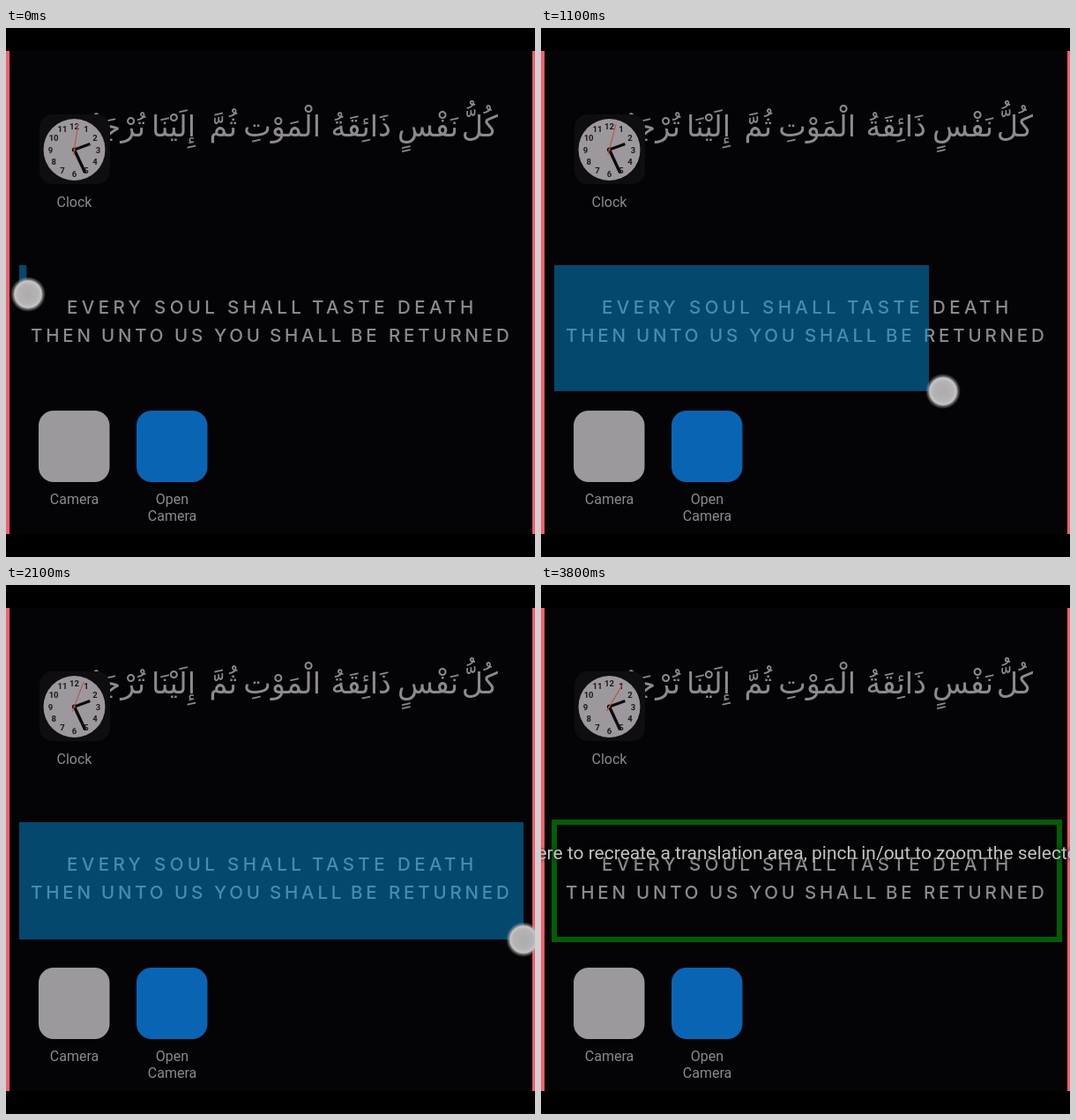
An HTML page with a canvas that plays this animation: 600x600 px, repeating every 3.9 s.

```html
<!DOCTYPE html>
<html lang="en">
<head>
<meta charset="utf-8">
<title>Selecting an area</title>
<style>
html, body { margin: 0; width: 100%; height: 100%; overflow: hidden; background: #000; }
canvas { display: block; }
</style>
</head>
<body>
<canvas id="stage" width="600" height="600"></canvas>
<script>
const ctx = document.getElementById('stage').getContext('2d');
const LOOP = 3900, STEP = 100, RELEASE = 2200, FADE_END = 2500;
const CORNER = { x: 15, y: 269 };
const LAG = 26;
const INK = '#8c8a8c';

// Finger path: time, position, then velocity in px per 100 ms.
const path = [
  { t: 0, x: 25, y: 302, vx: 7, vy: 45 },
  { t: 700, x: 203, y: 407, vx: 52, vy: 2 },
  { t: 1100, x: 456, y: 412, vx: 60, vy: 0.5 },
  { t: 1700, x: 584, y: 404, vx: 2, vy: -1 },
  { t: 2200, x: 587, y: 402, vx: 0, vy: 0 }
];

// Each word with its right edge.
const arabic = [
  ['كُلُّ', 558], ['نَفْسٍ', 513], ['ذَائِقَةُ', 437], ['الْمَوْتِ', 357],
  ['ثُمَّ', 262], ['إِلَيْنَا', 215], ['تُرْجَعُ\u200d', 158]
];

function hermite(a, b, va, vb, u) {
  const u2 = u * u, u3 = u2 * u;
  return (2 * u3 - 3 * u2 + 1) * a + (u3 - 2 * u2 + u) * va +
    (3 * u2 - 2 * u3) * b + (u3 - u2) * vb;
}

function fingerAt(t) {
  const time = Math.min(t, RELEASE);
  let i = 0;
  while (i < path.length - 2 && time > path[i + 1].t) i++;
  const a = path[i], b = path[i + 1];
  const span = b.t - a.t, u = (time - a.t) / span, k = span / 100;
  return {
    x: hermite(a.x, b.x, a.vx * k, b.vx * k, u),
    y: hermite(a.y, b.y, a.vy * k, b.vy * k, u)
  };
}

function text(str, x, y, font, color = INK, align = 'center') {
  ctx.font = font;
  ctx.fillStyle = color;
  ctx.textAlign = align;
  ctx.fillText(str, x, y);
}

function roundBox(x, y, w, h, r, color) {
  ctx.fillStyle = color;
  ctx.beginPath();
  ctx.roundRect(x, y, w, h, r);
  ctx.fill();
}

function disc(x, y, r, color) {
  ctx.fillStyle = color;
  ctx.beginPath();
  ctx.arc(x, y, r, 0, Math.PI * 2);
  ctx.fill();
}

function spacedLine(words, starts, y, spacing) {
  ctx.letterSpacing = spacing + 'px';
  words.split(' ').forEach((word, i) =>
    text(word, starts[i] - 1, y, '500 20.5px Inter, sans-serif', INK, 'left'));
  ctx.letterSpacing = '0px';
}

function drawWallpaper() {
  ctx.fillStyle = '#000';
  ctx.fillRect(0, 0, 600, 600);
  ctx.fillStyle = '#040305';
  ctx.fillRect(0, 26, 600, 548);

  ctx.save();
  ctx.beginPath();
  ctx.rect(97, 60, 503, 110);
  ctx.clip();
  ctx.direction = 'rtl';
  for (const [word, right] of arabic)
    text(word, right, 123, '33.5px "DejaVu Sans", sans-serif', INK, 'right');
  ctx.restore();

  spacedLine('EVERY SOUL SHALL TASTE DEATH', [70, 169, 252, 348, 445], 324, 4.4);
  spacedLine('THEN UNTO US YOU SHALL BE RETURNED',
    [29, 109, 192, 237, 300, 392, 435], 356, 3.8);
}

function hand(angle, tail, length, width, color) {
  ctx.save();
  ctx.rotate(angle * Math.PI / 180);
  ctx.strokeStyle = color;
  ctx.lineWidth = width;
  ctx.beginPath();
  ctx.moveTo(0, tail);
  ctx.lineTo(0, -length);
  ctx.stroke();
  ctx.restore();
}

function drawClock(t) {
  roundBox(38, 98, 80, 79, 15, '#0e0d0f');
  ctx.save();
  ctx.translate(77.5, 138);
  disc(0, 0, 35, '#9c989d');
  for (let n = 1; n <= 12; n++) {
    const a = n * Math.PI / 6;
    text(n, Math.sin(a) * 27, 3.5 - Math.cos(a) * 27,
      'bold 9.5px Roboto, sans-serif', '#1c1a1d');
  }
  hand(70, 0, 19, 3, '#0b0a0b');
  hand(155, 0, 29, 3.4, '#0b0a0b');
  disc(0, 0, 2.6, '#0b0a0b');
  hand(8 + t * 0.006, 6, 30, 1.1, '#b8543f');
  disc(0, 0, 1.2, '#b8543f');
  ctx.restore();
}

function drawApps(t) {
  const label = '16px Roboto, sans-serif';
  drawClock(t);
  text('Clock', 77.5, 203, label);
  roundBox(37, 434, 80.5, 81, 17, '#9b999b');
  text('Camera', 77.5, 540, label);
  roundBox(148, 434, 80.5, 81, 17, '#0a64b4');
  text('Open', 188.5, 540, label);
  text('Camera', 188.5, 559, label);
}

function drawSelection(t) {
  if (t < RELEASE) {
    const end = fingerAt(t - LAG);
    ctx.fillStyle = 'rgba(5, 141, 216, 0.5)';
    ctx.fillRect(CORNER.x, CORNER.y, end.x - CORNER.x, end.y - CORNER.y);
    return;
  }
  ctx.strokeStyle = '#025d06';
  ctx.lineWidth = 6;
  ctx.strokeRect(CORNER.x, CORNER.y, 573, 133);

  const font = '21px Roboto, sans-serif';
  ctx.save();
  ctx.shadowColor = '#000';
  ctx.shadowBlur = 5;
  text('Tap here to recreate a translation area, ', 307, 311, font, '#c4c3c4', 'right');
  text('pinch in/out to zoom the selected area', 307, 311, font, '#c4c3c4', 'left');
  ctx.restore();
}

function drawFinger(t) {
  if (t >= FADE_END) return;
  const { x, y } = fingerAt(t);
  const radius = 20;
  const glow = ctx.createRadialGradient(x, y, 0, x, y, radius);
  glow.addColorStop(0, '#adabac');
  glow.addColorStop(0.55, '#b4b2b3');
  glow.addColorStop(0.76, '#c6c4c5');
  glow.addColorStop(0.84, 'rgba(175, 173, 174, 0.6)');
  glow.addColorStop(1, 'rgba(150, 150, 150, 0)');
  ctx.save();
  if (t >= RELEASE) ctx.globalAlpha = 1 - (t - RELEASE) / (FADE_END - RELEASE);
  disc(x, y, radius, glow);
  ctx.restore();
}

function drawEdges() {
  ctx.fillStyle = '#f65f6f';
  ctx.fillRect(0, 26, 4, 548);
  ctx.fillRect(597, 26, 3, 548);
}

const start = performance.now();

function frame() {
  const elapsed = (performance.now() - start) % LOOP;
  const t = Math.floor(elapsed / STEP) * STEP;
  drawWallpaper();
  drawApps(t);
  drawEdges();
  drawSelection(t);
  drawFinger(t);
  requestAnimationFrame(frame);
}

frame();
</script>
</body>
</html>
```
